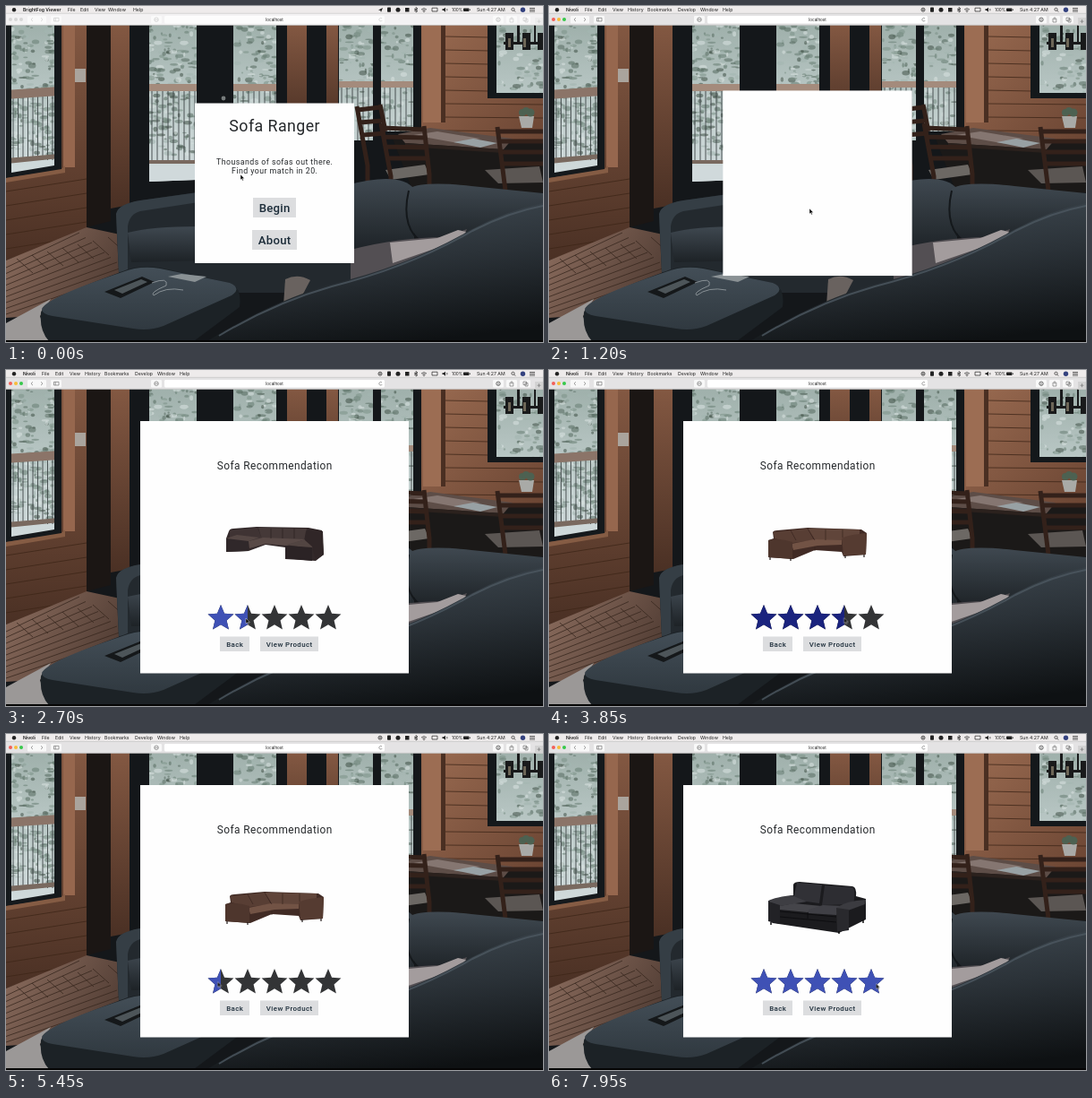
An HTML page that plays this animation: 600x375 px, repeating every 8 s.

```html
<!DOCTYPE html>
<html lang="en">
<head>
<meta charset="utf-8">
<title>Sofa Ranger</title>
<style>
html, body { margin: 0; width: 100%; height: 100%; overflow: hidden; background: #000; }
svg { display: block; width: 100%; height: 100%; }
text { font-family: Roboto, Arial, sans-serif; fill: #25282b; letter-spacing: .05em; }
.mid { text-anchor: middle; }
.bar text { font: 5.2px Inter, "Open Sans", sans-serif; letter-spacing: 0; fill: #1c1c1c; }
.bar .app { font-weight: 600; font-size: 5.1px; }
.title { font-size: 17.8px; letter-spacing: .025em; }
.big { font-size: 13.2px; font-weight: 500; fill: #1d2d3a; letter-spacing: .02em; }
.small { font-size: 7.9px; font-weight: 500; fill: #1d2d3a; }
.button { fill: #dcdddf; }

.anim { animation: 8s linear infinite; }
#before { animation-name: leave; animation-timing-function: step-end; }
#after { opacity: 0; animation-name: arrive; animation-timing-function: step-end; }
@keyframes leave { 0% { opacity: 1 } 10%, 100% { opacity: 0 } }
@keyframes arrive { 0% { opacity: 0 } 10%, 100% { opacity: 1 } }

#card { animation-name: grow; animation-timing-function: ease-in-out; }
@keyframes grow {
  0%, 12.75% { x: 211px; y: 108.5px; width: 178px; height: 178.5px }
  19%, 100% { x: 150px; y: 57px; width: 300px; height: 281.5px }
}
#home { animation-name: home; }
@keyframes home { 0%, 11.7% { opacity: 1 } 13%, 100% { opacity: 0 } }
#rate { animation-name: rate; }
@keyframes rate { 0%, 18.1% { opacity: 0 } 19.8%, 100% { opacity: 1 } }

.sofa { animation-timing-function: step-end; }
#sofa1 { animation-name: first; }
#sofa2 { animation-name: second; }
#sofa3 { animation-name: third; }
@keyframes first { 0% { opacity: 1 } 35.6%, 100% { opacity: 0 } }
@keyframes second { 0% { opacity: 0 } 35.6% { opacity: 1 } 70%, 100% { opacity: 0 } }
@keyframes third { 0% { opacity: 0 } 70%, 100% { opacity: 1 } }

#lit { animation-name: press; animation-timing-function: step-end; }
@keyframes press {
  0% { fill: #1a237e } 31.8% { fill: #3f51b5 } 35.6% { fill: #1a237e }
  67.5% { fill: #3f51b5 } 70% { fill: #1a237e } 95.6%, 100% { fill: #3f51b5 }
}
#level { animation-name: level; animation-timing-function: step-end; }
@keyframes level {
  0% { width: 0 }
  26.5% { width: 60px } 27.4% { width: 45px } 35.6% { width: 0 }
  43.1% { width: 45px; animation-timing-function: steps(4) }
  47% { width: 105px } 48.7% { width: 120px }
  56.25% { width: 120px; animation-timing-function: steps(7) }
  65.9% { width: 15px } 70% { width: 0 }
  73.1% { width: 15px; animation-timing-function: steps(4) }
  78.4% { width: 75px }
  80.6% { width: 75px; animation-timing-function: steps(4) }
  84% { width: 135px } 86.8%, 100% { width: 150px }
}
#cursor { animation-name: move; }
@keyframes move {
  0%, .6% { transform: translate(262px, 188px); animation-timing-function: ease-in-out }
  9.4%, 23.1% { transform: translate(291px, 226px); animation-timing-function: ease-in-out }
  28.1%, 43.1% { transform: translate(268px, 277px) }
  48.1% { transform: translate(329.5px, 276.5px); animation-timing-function: ease-out }
  53.1%, 56.25% { transform: translate(341px, 277px) }
  66.25%, 73.1% { transform: translate(236.5px, 276.5px) }
  78.75%, 80.6% { transform: translate(300px, 278px) }
  85% { transform: translate(359.5px, 278.5px); animation-timing-function: ease-out }
  90.6%, 100% { transform: translate(365.5px, 278.5px) }
}
</style>
</head>
<body>
<svg viewBox="0 0 600 375">
<defs>
  <clipPath id="glass">
    <path d="M6 21H54V178L6 186zM160 21H213V194L160 196zM254 21H302V200H254zM372 21H410V150H372zM419 21H455V140H419zM548 21H600V97H548z"/>
  </clipPath>
  <clipPath id="level-clip"><rect id="level" class="anim" x="225" y="258" width="0" height="36"/></clipPath>
  <linearGradient id="sky" x2="0" y2="1"><stop stop-color="#9fb0ab"/><stop offset=".6" stop-color="#c3d0cf"/><stop offset="1" stop-color="#d3dcde"/></linearGradient>
  <linearGradient id="arm" x1=".35" x2=".65" y2="1"><stop stop-color="#3f4951"/><stop offset=".45" stop-color="#2b3238"/><stop offset="1" stop-color="#0e1113"/></linearGradient>
  <linearGradient id="seat" x2="0" y2="1"><stop stop-color="#3f4850"/><stop offset="1" stop-color="#1d2226"/></linearGradient>
  <linearGradient id="top" x2="0" y2="1"><stop stop-color="#434e57"/><stop offset="1" stop-color="#303940"/></linearGradient>
  <linearGradient id="wood" x2="0" y2="1"><stop stop-color="#835842"/><stop offset="1" stop-color="#4a3024"/></linearGradient>
  <linearGradient id="wall" x2="1" y2="1"><stop stop-color="#9a6b51"/><stop offset="1" stop-color="#6b4533"/></linearGradient>
  <linearGradient id="floor" x2="1" y2=".4"><stop stop-color="#8d6e5f"/><stop offset="1" stop-color="#4a372f"/></linearGradient>
  <filter id="soft"><feGaussianBlur stdDeviation=".7"/></filter>
</defs>

<!-- room -->
<rect width="600" height="375" fill="#14171a"/>
<g fill="url(#wood)">
  <path d="M62 21H90V250L0 284V190L62 182z"/>
  <path d="M117 21H138V222L117 226z"/>
  <path d="M314 21H336V110H314zM358 21H371V140H358z"/>
</g>
<path d="M464 21H540V103H600V152H464z" fill="url(#wall)"/>
<g id="planks" stroke="#3e2619" stroke-width=".8"/>
<path d="M466 21H488V130H466z" fill="#9c6d53"/>
<path d="M486 21H491V130H486z" fill="#4a2f22"/>
<path d="M64 21H77V180H64z" fill="#96674e"/>
<rect x="77" y="70" width="12" height="15" fill="#aaa49d"/>
<path d="M90 21H117V240L90 247z" fill="#1b1614"/>
<path d="M0 21H62V183L0 192z" fill="#15191c"/>
<path d="M0 192L62 182L66 178V186L0 197z" fill="#855c44"/>
<path d="M538 21H600V103H538z" fill="#14181b"/>

<g clip-path="url(#glass)">
  <rect y="21" width="600" height="180" fill="url(#sky)"/>
  <g id="trees" filter="url(#soft)"/>
  <path d="M160 178H213V200H160zM254 178H302V200H254z" fill="#d0d9db"/>
  <g id="posts" stroke="#3d4546" stroke-width=".9"/>
  <path d="M0 94L60 90V100L0 104z" fill="#8b7468"/>
  <path d="M160 87H302V95H160zM372 84H455V91H372z" fill="#a48b7c"/>
  <path d="M0 170L60 165V170L0 176zM160 172H302V176H160z" fill="#79695f"/>
</g>
<circle cx="243" cy="103" r="2.4" fill="#777c7c"/>

<!-- lamp, table, chairs -->
<g fill="#191a1b">
  <path d="M556 40H600V43H556zM571 21H574V42H571zM590 21H592V42H590z"/>
  <path d="M558 30H567V49H558zM577 30H586V49H577zM594 30H600V49H594z"/>
</g>
<path d="M578 36H581V46H578zM561 36H564V46H561z" fill="#6d6657"/>
<path d="M432 148L600 150V208H455z" fill="#1b1918"/>
<path d="M438 143L474 136L566 148L556 160L446 153z" fill="#5d4d47"/>
<path d="M455 144L482 140L530 148L505 153z" fill="#857671"/>
<path d="M446 153L556 160V164L446 157z" fill="#2b211d"/>
<path d="M500 152L522 148L549 153L530 158z" fill="#98a1a4"/>
<path d="M573 123H590L588 136H576z" fill="#a9aaa7"/>
<g fill="#4d6151"><circle cx="577" cy="119" r="4"/><circle cx="586" cy="119" r="4.5"/><circle cx="581" cy="117" r="4"/></g>
<path d="M424 183L468 177L473 188L430 194z" fill="#6c6864"/>
<path d="M535 183L596 179L600 197L550 198z" fill="#5b5653"/>
<g fill="none" stroke="#33211a" stroke-width="5">
  <path d="M392 112L404 178V205M418 110L424 140M393 116L418 113M396 130L420 128M399 144L424 142"/>
  <path d="M419 131L430 190V206M467 134L473 188V206M420 136L468 138M422 146L469 147M424 157L470 158M427 170L471 170"/>
  <path d="M549 135L558 206M549 140H600M551 151H600M553 163H600M555 176H600"/>
</g>

<!-- floor and seating -->
<path d="M0 284L90 247L160 262V300L45 345L0 348z" fill="url(#floor)"/>
<g id="boards" stroke="#38271f" stroke-width=".8"/>
<path d="M0 354L50 327L38 346L48 374H0z" fill="#9b9897"/>
<path d="M123 235Q122 222 150 217L220 207H400V320H240L126 298z" fill="#23292e"/>
<path d="M123 232Q125 221 150 217L215 208V219L150 229Q138 232 136 246V296L126 297z" fill="#353e45"/>
<path d="M136 253Q165 245 230 246V284L140 286z" fill="url(#seat)"/>
<path d="M380 200Q440 184 456 204V262L380 275z" fill="url(#seat)"/>
<path d="M450 204Q465 195 520 201L600 209V265H470Q440 250 450 204z" fill="url(#seat)"/>
<path d="M450 206Q442 240 458 258" fill="none" stroke="#14181b" stroke-width="2"/>
<path d="M385 272Q440 258 490 258L515 249L508 265L430 297L385 308z" fill="#534f53"/>
<path d="M429 264L482 259L505 250L514 252L505 262L432 287z" fill="#a39c9d"/>
<path d="M312 305Q326 298 340 306L330 325L310 334z" fill="#69625f"/>
<path d="M225 374Q296 330 362 311Q450 290 519 250Q560 228 600 220V374z" fill="url(#arm)"/>
<path d="M238 368Q300 331 364 313Q452 291 521 251Q562 230 600 223" fill="none" stroke="#4d5861" stroke-width="2" opacity=".8"/>
<path d="M39 342Q42 328 128 297Q148 288 172 292L250 309Q264 314 261 336L210 374H48Q37 362 39 342z" fill="#1c2226"/>
<path d="M40 338Q46 325 130 297Q150 289 172 293L250 309Q264 315 252 323L176 357Q160 363 142 360L52 346Q40 344 40 338z" fill="url(#top)"/>
<path d="M110 319L152 302L166 308L128 326z" fill="#15181a"/>
<path d="M121 317L151 305L158 308L130 321z" fill="#4d5559"/>
<path d="M163 309Q182 302 179 312Q160 320 165 323Q178 313 198 317" fill="none" stroke="#9ba2a6" stroke-width=".8"/>
<path d="M181 302L196 299L224 302L211 308z" fill="#8a9194"/>
<rect y="373" width="600" height="2" fill="#050505"/>

<!-- menu bar and browser bar -->
<g class="bar">
  <rect width="600" height="8.5" fill="#eeebeb"/>
  <rect y="8" width="600" height="13.5" fill="#e4e3e4"/>
  <path d="M0 8.3H600M0 21.3H600" stroke="#bcbcbc" stroke-width=".6"/>
  <circle cx="9" cy="4.2" r="2.2" fill="#222"/>
  <g fill="#222">
    <rect x="426" y="1.6" width="4" height="5.2" rx=".8"/>
    <circle cx="438" cy="4.2" r="2.5"/>
    <rect x="446" y="2" width="4.5" height="4.5"/>
    <circle cx="467" cy="6.2" r=".7"/><path d="M487.5 3.3H489L491 1.7V6.7L489 5.1H487.5z"/>
    <rect x="511" y="2.4" width="6.5" height="3.6" rx=".7"/><rect x="518" y="3.5" width=".7" height="1.5"/>
  </g>
  <g fill="none" stroke="#222" stroke-width=".7">
    <path d="M458 1.5V7L460 5.5L456 3M456 5.5L460 3L458 1.5M464 4Q467 1 470 4M465.3 5.2Q467 3.6 468.7 5.2M476 2.2H482V6H476zM492.5 3Q493.5 4.2 492.5 5.4"/>
    <circle cx="566.5" cy="3.8" r="1.6"/><path d="M567.7 5L569.2 6.6M585 2.5H591M585 4.3H591M585 6.1H591"/>
  </g>
  <circle cx="577.5" cy="4.2" r="2.7" fill="#34427f"/>
  <text x="498" y="6" style="font-size:4.7px">100%</text>
  <text x="526" y="6">Sun 4:27 AM</text>
  <rect x="24" y="11" width="21" height="8.5" rx="1.3" fill="#f8f8f8"/>
  <rect x="50" y="11" width="12" height="8.5" rx="1.3" fill="#f8f8f8"/>
  <rect x="177" y="11" width="246" height="8.5" rx="1.4" fill="#fff"/>
  <rect x="162" y="11" width="12" height="8.5" rx="1.3" fill="#f8f8f8"/>
  <g fill="#f8f8f8"><rect x="544" y="11" width="12" height="8.5" rx="1.3"/><rect x="559" y="11" width="12" height="8.5" rx="1.3"/><rect x="574" y="11" width="12" height="8.5" rx="1.3"/></g>
  <rect x="591" y="13" width="9" height="8.5" fill="#d2d2d2"/>
  <g fill="none" stroke="#777" stroke-width=".7">
    <path d="M30 13.3L28 15.2L30 17.1M39 13.3L41 15.2L39 17.1M53.5 13.3H59V17H53.5zM55.3 13.3V17M166 15.2H170M563 14H566.8V18H563zM565 15.5V12.2M578 13H581.5V16.5H578zM580 14.5H583V18H580zM593.5 17.2H597.5M595.5 15.2V19.2M420 14A1.8 1.8 0 1 0 420.3 16"/>
    <circle cx="168" cy="15.2" r="2.3"/><circle cx="550" cy="15.2" r="2.2" stroke="#333"/><path d="M550 14V16.4M549 15.5L550 16.5L551 15.5"/>
  </g>
  <g id="before" class="anim">
    <rect y="8.6" width="600" height="12.4" fill="#fafafa" opacity=".65"/>
    <text class="app" x="19" y="6">BrightFog Viewer</text>
    <text x="69" y="6">File</text><text x="83" y="6">Edit</text><text x="99" y="6">View</text>
    <text x="114" y="6">Window</text><text x="142" y="6">Help</text>
    <g fill="#d6d6d6"><circle cx="5" cy="15" r="2"/><circle cx="11" cy="15" r="2"/><circle cx="17" cy="15" r="2"/></g>
    <path d="M416 4.5L421 2L419 7L418.3 5z" fill="#222"/>
  </g>
  <g id="after" class="anim">
    <text class="app" x="19" y="6">Nivoli</text>
    <text x="40" y="6">File</text><text x="55" y="6">Edit</text><text x="71" y="6">View</text>
    <text x="88" y="6">History</text><text x="110" y="6">Bookmarks</text><text x="144" y="6">Develop</text>
    <text x="169" y="6">Window</text><text x="194" y="6">Help</text>
    <circle cx="5" cy="15" r="2" fill="#f25f58"/><circle cx="11" cy="15" r="2" fill="#f8bc38"/><circle cx="17" cy="15" r="2" fill="#36c84b"/>
    <circle cx="418" cy="4.2" r="2" fill="none" stroke="#222" stroke-width=".8"/><circle cx="418" cy="4.2" r=".8" fill="#222"/>
  </g>
  <text class="mid" x="300" y="17" style="font-size:4.6px">localhost</text>
</g>

<!-- card -->
<rect id="card" class="anim" x="211" y="108.5" width="178" height="178.5" fill="#fefefe"/>
<g id="home" class="anim mid">
  <text class="title" x="300.2" y="139.7">Sofa Ranger</text>
  <text x="300.2" y="177" font-size="8.8">Thousands of sofas out there.</text>
  <text x="300.2" y="187.3" font-size="8.8">Find your match in 20.</text>
  <rect class="button" x="276" y="214" width="48" height="22"/>
  <rect class="button" x="275" y="250" width="50" height="22"/>
  <text class="big" x="300.1" y="229.7">Begin</text>
  <text class="big" x="300.1" y="265.6">About</text>
</g>
<g id="rate" class="anim">
  <text class="mid" x="300.3" y="110.8" font-size="11.9" style="letter-spacing:.035em">Sofa Recommendation</text>
  <g id="sofa1" class="anim sofa">
    <path d="M249 180Q250 177 254 177L280 175L338 176L353 179L355 206L346 213L312 211V198L290 195L271 202L246 203V188z" fill="#33292a"/>
    <path d="M282 176L336 177L333 190L286 189z" fill="#453938"/>
    <path d="M250 179L281 176L286 188L272 191L250 187z" fill="#3f3333"/>
    <path d="M271 191L287 187L334 189L314 196L290 194L272 199z" fill="#594a47"/>
    <path d="M246 188L271 190V202L246 203z" fill="#30282a"/>
    <path d="M246 188L258 184L283 187L271 191z" fill="#554744"/>
    <path d="M312 195L335 189L347 197L341 199z" fill="#524542"/>
    <path d="M312 196L342 198V213L312 210z" fill="#2b2325"/>
    <path d="M335 180Q340 176 354 180L355 206L346 212L342 197L334 190z" fill="#302627"/>
    <path d="M296 177V188M309 177V188M322 177V188" stroke="#292122" stroke-width=".7"/>
  </g>
  <g id="sofa2" class="anim sofa">
    <path d="M250 181Q251 179 255 179L289 176L349 178L355 182L354 206L329 208L327 203L297 201L273 211L245 209V190L251 188z" fill="#412b25"/>
    <path d="M251 181L289 177L296 190L272 193L252 188z" fill="#583e34"/>
    <path d="M289 177L347 178V187L327 190L297 190z" fill="#60453a"/>
    <path d="M271 194L296 189L327 190V195L300 196L273 201z" fill="#725345"/>
    <path d="M245 190Q258 187 272 192V211L245 209z" fill="#4e362d"/>
    <path d="M327 188Q333 184 355 182L354 206L329 207z" fill="#553b31"/>
    <path d="M270 179L276 190M289 177L297 190M309 178V190M328 178V187M297 197V202" stroke="#38251f" stroke-width=".7"/>
    <path d="M247 209V212M270 210V213M331 207V210M352 206V209" stroke="#201a19" stroke-width="1.2"/>
  </g>
  <g id="sofa3" class="anim sofa">
    <path d="M273 168Q274 165 280 165L339 170Q344 171 343 181L354 184V207L324 222L250 211L245 208V186L273 180z" fill="#1b1b1e"/>
    <path d="M277 166L305 168L302 189L273 185z" fill="#313136"/>
    <path d="M308 169L339 171Q343 174 340 190L305 191z" fill="#2d2d32"/>
    <path d="M245 187Q247 183 271 180L288 187L258 192z" fill="#3e3e43"/>
    <path d="M258 192L274 189L304 192L289 199L258 196z" fill="#45454a"/>
    <path d="M290 196L306 191L332 192L321 202L290 200z" fill="#404046"/>
    <path d="M321 194Q332 186 354 185L353 190L334 197z" fill="#3b3b40"/>
    <path d="M245 187L258 191V212L245 209z" fill="#222226"/>
    <path d="M321 194L335 196V219L322 221z" fill="#29292d"/>
    <path d="M258 198L289 201L321 204M258 204L321 210M289 200V206" stroke="#0b0b0d" stroke-width=".8" fill="none"/>
    <path d="M248 210V213M324 220V223M351 207V211" stroke="#101012" stroke-width="1.5"/>
  </g>
  <g fill="#333436" class="stars"></g>
  <g clip-path="url(#level-clip)"><g id="lit" class="anim stars"></g></g>
  <rect class="button" x="239" y="297.5" width="33" height="16.5"/>
  <rect class="button" x="284" y="297.5" width="65" height="16.5"/>
  <g class="mid"><text class="small" x="255.7" y="308.5">Back</text><text class="small" x="316.7" y="308.5">View Product</text></g>
</g>
<path id="cursor" class="anim" d="M0 0V6L1.4 4.8L2.3 6.9L3.3 6.5L2.4 4.5H4.3z" fill="#000" stroke="#fff" stroke-width=".4"/>
</svg>
<script>
const NS = 'http://www.w3.org/2000/svg';
const pick = sel => document.querySelector(sel);
let seed = 17;
const rnd = () => (seed = seed * 16807 % 2147483647) / 2147483647;

function add(parent, tag, attrs) {
  const el = document.createElementNS(NS, tag);
  for (const key in attrs) el.setAttribute(key, attrs[key]);
  parent.appendChild(el);
}
const line = (sel, x1, y1, x2, y2) => add(pick(sel), 'line', { x1, y1, x2, y2 });

// foliage behind the glass
const greens = ['#5b6f66', '#7f948b', '#48594f', '#a4b6b0', '#d5dfde', '#6c8278'];
for (const [left, width, count] of [[6, 48, 200], [160, 53, 200], [254, 48, 180], [372, 83, 240], [548, 52, 110]]) {
  for (let i = 0; i < count; i++) {
    add(pick('#trees'), 'ellipse', {
      cx: left + rnd() * width, cy: 21 + rnd() * 145,
      rx: 1 + rnd() * 4, ry: .7 + rnd() * 2.2,
      fill: greens[Math.floor(rnd() * greens.length)], opacity: .6
    });
  }
}
for (let x = 8; x < 60; x += 5.5) line('#posts', x, 100, x, 172);
for (let x = 163; x < 303; x += 6) line('#posts', x, 94, x, 174);
for (let x = 375; x < 456; x += 6) line('#posts', x, 89, x, 150);

// wall planks and floor boards
for (let y = 34; y < 150; y += 15) line('#planks', 490, y, y < 103 ? 540 : 600, y + 1);
for (let y = 207; y < 280; y += 16) line('#planks', 0, y, 90, y - 14);
for (let i = 0; i < 9; i++) line('#boards', 0, 292 + i * 6.5, 82 + i * 7, 253 + i * 5.5);
for (let i = 0; i < 7; i++) line('#boards', 12 + i * 17, 282 - i * 4, 30 + i * 17, 298 - i * 4);

// rating stars
for (let i = 0; i < 5; i++) {
  const points = Array.from({ length: 10 }, (_, k) => {
    const r = k % 2 ? 6.9 : 15.2, a = k * Math.PI / 5;
    return [240 + i * 30 + r * Math.sin(a), 277.3 - r * Math.cos(a)].map(v => v.toFixed(2));
  }).join(' ');
  for (const group of document.querySelectorAll('.stars')) add(group, 'polygon', { points });
}
</script>
</body>
</html>
```
